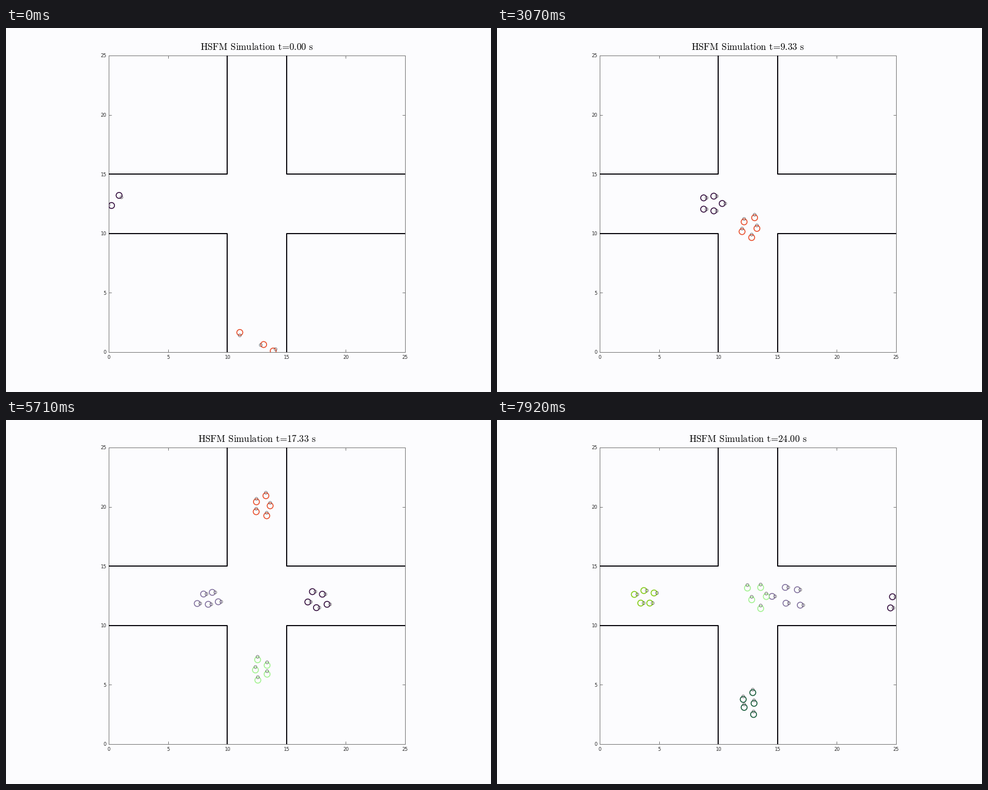
A matplotlib script that plays this animation: 864 px wide and 648 px high, repeating every 8 s.

```python
import numpy as np
import matplotlib.pyplot as plt
from matplotlib.animation import FuncAnimation

W, H, DPI = 864, 648, 72
LEFT, RIGHT, TOP, BOTTOM = 183, 711, 49, 577
UNIT = (RIGHT - LEFT) / 25
RADIUS = 0.25 * UNIT
INTERVAL, FRAMES, STEP_MS = 50, 160, 110
BACK, GREY = "#fcfcfe", "#747474"
EAST, NORTH = 0, 90
SPEED_UP = 3        # steps a walker needs to reach full speed
MEETING = 28        # age at which a group reaches the crossing

plt.rcParams["font.family"] = "DejaVu Sans"
plt.rcParams["mathtext.fontset"] = "cm"
rng = np.random.default_rng(4)

fig = plt.figure(figsize=(W / DPI, H / DPI), dpi=DPI, facecolor=BACK)
ax = fig.add_axes([LEFT / W, 1 - BOTTOM / H, (RIGHT - LEFT) / W, (BOTTOM - TOP) / H],
                  facecolor=BACK)
# Data units are stage pixels, with y pointing down.
ax.set(xlim=(LEFT, RIGHT), ylim=(BOTTOM, TOP))
metres = np.arange(0, 26, 5)
ax.set_xticks(LEFT + metres * UNIT, [str(m) for m in metres])
ax.set_yticks(BOTTOM - metres * UNIT, [str(m) for m in metres])
ax.tick_params(direction="in", length=5, width=1, color=GREY, labelcolor="#262626",
               labelsize=8.4, top=True, right=True)
ax.tick_params(axis="x", pad=5)
ax.tick_params(axis="y", pad=4)
for spine in ax.spines.values():
    spine.set(color=GREY, linewidth=1)

for x, x_end in ((10, 0), (15, 25)):
    for y, y_end in ((10, 0), (15, 25)):
        ax.plot(LEFT + np.array([x_end, x, x]) * UNIT,
                BOTTOM - np.array([y, y, y_end]) * UNIT, color="#0c0a10", lw=2, zorder=3)

title = fig.text((LEFT + RIGHT) / 2 / W, 1 - 39.3 / H, "", fontsize=16.8,
                 color="black", ha="center", va="baseline")


def smooth(u):
    u = np.clip(u, 0, 1)
    return u * u * (3 - 2 * u)


def direction(degrees):
    angle = np.radians(degrees)
    return np.column_stack([np.cos(angle), -np.sin(angle)])


class Group:
    """Five walkers in a ring that is bent and held up where the flows cross."""

    def __init__(self, color, heading, birth, start, velocity, phase, size, bulge, lean=0,
                 nudge=(0, 0), twist=0, spread=0, spawn=None):
        self.heading, self.birth = heading, birth
        self.start, self.velocity, self.nudge = map(np.array, (start, velocity, nudge))
        self.twist, self.spread = twist, spread
        self.angles = phase + 72 * np.arange(5)
        self.radii = size + bulge * np.cos(2 * np.radians(self.angles - lean))
        ring = self.ring(0)
        if spawn is None:
            self.scatter = rng.normal(0, 4, (5, 2))
            self.turns = rng.uniform(-90, 90, 5)
        else:
            spawn = np.array(spawn)
            self.scatter = spawn[:, :2] - ring
            self.turns = spawn[:, 2]
        self.bodies = ax.scatter([], [], s=(2 * RADIUS) ** 2, facecolors="none",
                                 edgecolors=color, linewidths=1.6, zorder=4)
        self.noses = ax.scatter([], [], s=RADIUS ** 2, facecolors="none",
                                edgecolors="#484448", linewidths=0.7, zorder=5)

    def ring(self, age):
        push = smooth((age - MEETING) / 13)
        bend = push * (1 - 0.7 * smooth((age - MEETING - 18) / 14))
        travelled = age - SPEED_UP * (1 - np.exp(-age / SPEED_UP))
        centre = self.start + self.velocity * travelled + self.nudge * push
        reach = self.radii * (1 + self.spread * bend)
        return centre + reach[:, None] * direction(self.heading + self.angles + self.twist * bend)

    def show(self, step):
        age = step - self.birth
        for part in (self.bodies, self.noses):
            part.set_visible(age >= 0)
        if age < 0:
            return
        pos = self.ring(age) + self.scatter * np.exp(-age / 5)
        self.bodies.set_offsets(pos)
        self.noses.set_offsets(
            pos + RADIUS * direction(self.heading + self.turns * np.exp(-age / 2.5)))


groups = [
    Group("#35103f", EAST, 0, (179.5, 304.2), (8.1, 0.33), phase=0, size=16.2, bulge=3,
          nudge=(-22, 0), twist=-33,
          spawn=[(201.5, 298, -40), (172, 292, -70), (165, 302, 60),
                 (160, 322, 30), (188, 316, 170)]),
    Group("#e8502e", NORTH, 0, (450.5, 565), (0, -8.4), phase=-26, size=16, bulge=3.5,
          lean=-15, nudge=(7.5, 0), twist=15,
          spawn=[(459, 563.5, 100), (416.5, 542, 180), (430, 592, 60),
                 (451, 597, -40), (476, 575, -53)]),
    Group("#83739f", EAST, 30, (198.2, 319), (8.5, 0), phase=-14, size=15, bulge=6,
          lean=10, nudge=(-11, -5), twist=-22, spread=0.4),
    Group("#a2f290", NORTH, 30, (454.3, 602), (0, -8.27), phase=19, size=15, bulge=5,
          nudge=(9.5, 34), twist=32, spread=0.2),
    Group("#84cc16", EAST, 60, (188.7, 314.7), (8.2, 0), phase=22, size=15.4, bulge=4),
    Group("#145a38", NORTH, 60, (450, 580.6), (0, -8.4), phase=-17, size=15, bulge=7, lean=5),
]


def draw(frame):
    step = (frame * INTERVAL + 50) // STEP_MS
    gap = r"\hspace{0.38}"
    tight_equals = r"\hspace{-0.2}=\hspace{-0.2}"
    title.set_text(rf"$\mathrm{{HSFM{gap}Simulation{gap}t{tight_equals}{step / 3:.2f}{gap}s}}$")
    for group in groups:
        group.show(step)
    return []


animation = FuncAnimation(fig, draw, frames=FRAMES, interval=INTERVAL,
                          repeat=True, repeat_delay=0, blit=False)
plt.show()
```
